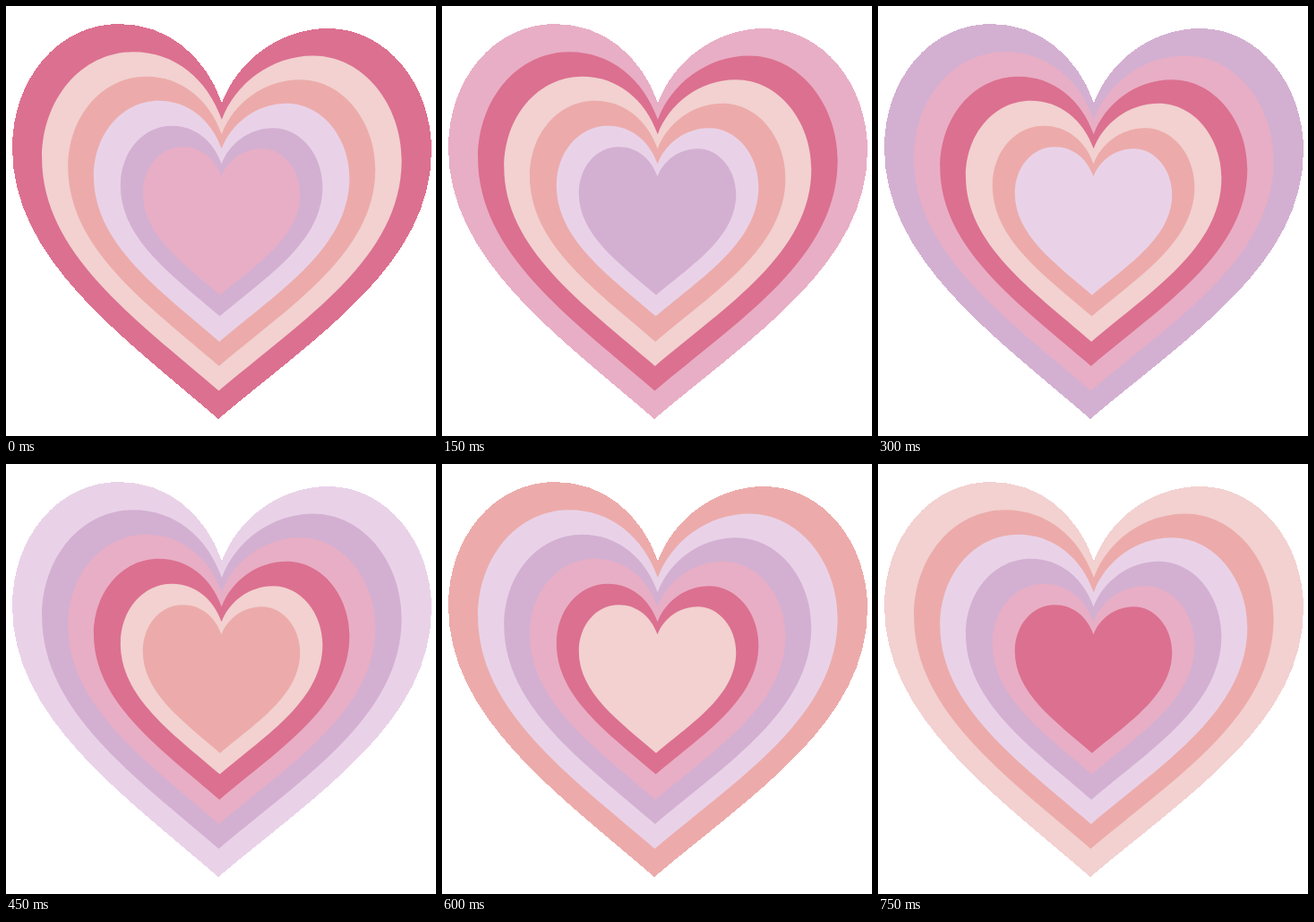
Recreate the animation shown at these times as an HTML page. Size 480 by 480 pixels, loop 900 ms.

```html
<!DOCTYPE html>
<html lang="en">
<head>
<meta charset="utf-8">
<title>Pulsing hearts</title>
<style>
  html, body { margin: 0; width: 100%; height: 100%; overflow: hidden; background: #fff; }
  svg { display: block; width: 100vw; height: 100vh; }
</style>
</head>
<body>
<svg viewBox="0 0 480 480"></svg>
<script>
const HEART = `M241 108 C258 62 305 25 360 25 C425 25 475 88 475 161
  C475 288 347 368 237 461 C127 366 7 282 7 158
  C7 82 58 20 126 20 C180 20 222 55 241 108Z`;
const CENTER = [240.2, 239.7];
const SCALES = [1, 0.858, 0.733, 0.61, 0.482, 0.375];
const COLORS = ['#dc7090', '#f2d1d0', '#ecabaa', '#e9d2e8', '#d3b0d1', '#e8aec5'];
const STEP_MS = 150;

const svg = document.querySelector('svg');
const [cx, cy] = CENTER;

const hearts = SCALES.map((scale, i) => {
  const path = document.createElementNS('http://www.w3.org/2000/svg', 'path');
  path.setAttribute('d', HEART);
  path.setAttribute('transform', `translate(${cx} ${cy}) scale(${scale}) translate(${-cx} ${-cy})`);
  if (i === 0) path.setAttribute('shape-rendering', 'crispEdges');
  return svg.appendChild(path);
});

// Each step moves every colour one ring inwards; the innermost returns to the outside.
function draw() {
  const count = COLORS.length;
  const step = Math.floor(performance.now() / STEP_MS) % count;
  hearts.forEach((heart, i) => heart.setAttribute('fill', COLORS[(i - step + count) % count]));
  requestAnimationFrame(draw);
}
draw();
</script>
</body>
</html>
```
